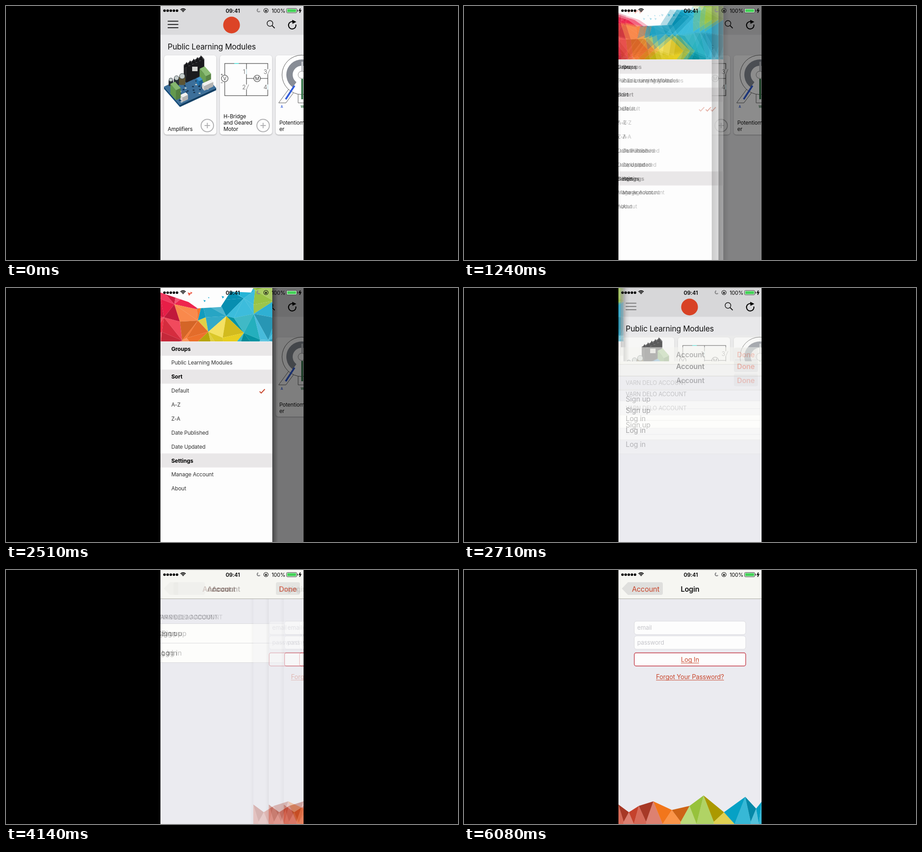
These frames come from a looping animation (998 by 561 pixels, 6120 ms). An HTML page with a canvas:

```html
<!DOCTYPE html>
<html lang="en">
<head>
<meta charset="utf-8">
<title>Learning modules app</title>
<style>
  html, body { margin: 0; width: 100%; height: 100%; overflow: hidden; background: #000; }
  canvas { display: block; width: 998px; height: 561px; }
</style>
</head>
<body>
<canvas id="stage" width="998" height="561"></canvas>
<script>
const W = 998, H = 561, LEFT = 341, WIDTH = 316, DRAWER = 247, BAR = 63.5;
const LOOP = 6120, STEP = 33.4, TAP = STEP / 2;
const OPEN = 1120, CLOSE = 2547, PUSH = 4088, SLIDE = 220;
const RED = '#c8452b', PAPER = '#fdfdfd', PAGE = '#ebebf0';

const stage = document.getElementById('stage').getContext('2d');
const buffer = document.createElement('canvas');
buffer.width = W;
buffer.height = H;
const c = buffer.getContext('2d');

const clamp = v => Math.max(0, Math.min(1, v));
const mix = (a, b, p) => a + (b - a) * p;
const easeOut = v => 1 - (1 - clamp(v)) ** 3;
// Critically damped spring from 0 to 1
function spring(ms) {
  const u = Math.max(0, ms) * 0.0176;
  return u > 11 ? 1 : 1 - (1 + u) * Math.exp(-u);
}
function random(n) {
  const v = Math.sin(n * 127.1 + 3.7) * 43758.5453;
  return v - Math.floor(v);
}
const tint = v => v > 0 ? `rgba(255,255,255,${v})` : `rgba(0,0,0,${-v})`;

function rect(fill, x, y, w, h) {
  c.fillStyle = fill;
  c.fillRect(x, y, w, h);
}
function trace(points) {
  c.beginPath();
  points.forEach(([x, y]) => c.lineTo(x, y));
}
function poly(fill, ...points) {
  trace(points);
  c.fillStyle = fill;
  c.fill();
}
function line(color, width, ...points) {
  trace(points);
  paint(null, color, width);
}
function paint(fill, stroke, width = 1) {
  if (fill) { c.fillStyle = fill; c.fill(); }
  if (stroke) { c.strokeStyle = stroke; c.lineWidth = width; c.stroke(); }
}
function circle(x, y, r, fill, stroke, width) {
  c.beginPath();
  c.arc(x, y, r, 0, 7);
  paint(fill, stroke, width);
}
function arc(x, y, r, from, to, color, width) {
  c.beginPath();
  c.arc(x, y, r, from, to);
  paint(null, color, width);
}
function box(x, y, w, h, r, fill, stroke, width) {
  c.beginPath();
  c.roundRect(x, y, w, h, r);
  paint(fill, stroke, width);
}
// y is the middle of the capital letters
function text(s, x, y, size, color = '#111', weight = 400, align = 'left') {
  c.font = `${weight} ${size}px Inter, sans-serif`;
  c.letterSpacing = `${-0.01 * size}px`;
  c.textAlign = align;
  c.fillStyle = color;
  c.fillText(s, x, y + size * 0.364);
  return c.measureText(s).width;
}
function link(s, y) {
  const w = text(s, 499, y, 14, RED, 400, 'center');
  rect(RED, 499 - w / 2, y + 7, w, 1);
}
function layer(alpha, x, y, draw) {
  if (alpha <= 0) return;
  c.save();
  c.globalAlpha *= alpha;
  c.translate(x, y);
  draw();
  c.restore();
}
function shade(x, w, alpha) {
  const g = c.createLinearGradient(x, 0, x + w, 0);
  g.addColorStop(0, tint(-alpha));
  g.addColorStop(1, 'rgba(0,0,0,0)');
  rect(g, x, 0, w, H);
}
function facet(color, light, ...points) {
  poly(color, ...points);
  poly(tint(light), ...points);
}

function statusBar() {
  for (let i = 0; i < 5; i++) circle(350 + i * 6.9, 10.3, 2.8, '#000');
  for (const r of [2, 5, 8]) arc(391, 14, r, -2.36, -0.78, '#000', 1.8);
  text('09:41', 500.7, 10.3, 12, '#000', 600, 'center');
  arc(558, 9.5, 3.4, 0.6, 4.4, '#8c8c8e', 2.4);
  circle(574, 10, 4.8, null, '#111', 1.1);
  rect('#111', 572, 9.5, 4, 3);
  arc(574, 9.4, 1.3, Math.PI, 0, '#111', 0.8);
  text('100%', 586.5, 10.3, 11.6, '#000');
  box(619.5, 5.5, 22.5, 9.5, 2, '#fff', '#333', 1);
  rect('#44d358', 621, 7, 19.5, 6.5);
  rect('#333', 643, 8.5, 1.5, 3.5);
  line('#000', 1.8, [650, 5.5], [647.5, 10.3], [651, 9.7], [648.3, 15]);
}

// Board space: u runs to the front corner, v to the back corner, z up.
const iso = (u, v, z) => [349 + 35 * u + 80 * v, 178 + 40 * u - 37 * v - z];
function block(color, u, v, du, dv, height, z = 0) {
  const top = z + height, front = u + du, back = v + dv;
  facet(color, -0.1, iso(u, v, z), iso(front, v, z), iso(front, v, top), iso(u, v, top));
  facet(color, -0.25, iso(front, v, z), iso(front, back, z), iso(front, back, top), iso(front, v, top));
  facet(color, 0.15, iso(u, v, top), iso(front, v, top), iso(front, back, top), iso(u, back, top));
}
function circuitBoard() {
  block('#1a5688', 0, 0, 1, 1, 5, -5);
  for (let i = 0; i < 45; i++) {
    const [x, y] = iso(0.08 + 0.84 * random(i), 0.05 + 0.9 * random(i + 60), 0);
    rect(i % 4 ? '#17324c' : '#cfd5cf', x - 2, y - 1, 4, 2.5);
  }
  block('#242428', 0.1, 0.5, 0.15, 0.5, 34);
  for (let i = 0; i < 5; i++) {
    const [x, y] = iso(0.1, 0.5 + i * 0.1, 34);
    poly('#17171a', [x, y + 6], [x + 6, y - 6], [x + 11, y + 5]);
  }
  rect('#d5d5d3', 411, 134, 12, 10);
  for (let i = 0; i < 3; i++) {
    const x = 364 + i * 12.5, y = 163 - i * 4, r = 5 + i;
    box(x - r, y, r * 2, r * 2.8, 3, i === 2 ? '#5d5534' : '#272f36');
    circle(x, y, r - 1, '#c5cdcb', '#39444a', 1);
  }
  block('#77b15d', 0.3, 0.85, 0.4, 0.14, 20);
  block('#2482c4', 0.45, 0.7, 0.15, 0.1, 10);
  block('#f0f0ee', 0.75, 0.72, 0.14, 0.25, 10);
  block('#f0f0ee', 0.8, 0.1, 0.14, 0.15, 10);
  block('#70ab56', 0.4, 0, 0.35, 0.13, 22);
}

function bridgeDiagram() {
  const ink = '#333', soft = '#555', left = 483, mid = 531, right = 578, top = 127, centre = 160, base = 198;
  c.strokeStyle = ink;
  c.lineWidth = 1.1;
  c.strokeRect(left, top, right - left, base - top);
  line(ink, 1.1, [mid, top], [mid, base]);
  line(ink, 1.1, [mid, centre], [right, centre]);
  line('#6be4dd', 2, [504, top], [514, top]);
  [[mid, 145], [right, 145], [mid, 179], [right, 179]].forEach(([x, y], i) => {
    const open = i === 1 || i === 2;
    rect(PAPER, x - 2, y - 5.5, 4, 11);
    line(open ? '#999' : '#b9dce4', 1.2, [x, y + 5.5], [x + (open ? 5 : 0), y - 5.5]);
    text([1, 3, 2, 4][i], x - 5.5, y + 0.7, 13, soft, 300, 'center');
  });
  for (const [x, s] of [[left, 'V'], [554.5, 'M']]) {
    circle(x, centre, 7.3, '#fff', ink, 1.1);
    text(s, x, centre, 10.5, ink, 400, 'center');
  }
  text('+', 476.5, 151, 9, ink, 400, 'center');
  text('−', 476.5, 169, 9, ink, 400, 'center');
}

function potentiometer() {
  const ink = '#555', blue = '#315cda', green = '#337246', x = 653, y = 152;
  line(ink, 1, [624, 184], [602, 214], [618, 214], [636, 190]);
  line(ink, 1, [645, 192], [645, 214], [664, 214]);
  circle(x, y, 43.5, '#fff', ink, 1);
  arc(x, y, 27, 2.2, 7.2, '#888d96', 14);
  line('#c3c5ca', 4, [x + 1, 123], [x + 1, 146]);
  circle(x, y, 8, '#fff', '#aaa', 1.3);
  line(green, 4, [x + 1, 161], [x + 1, 206]);
  line(blue, 4, [637, 176], [617.5, 206]);
  text('A', 609, 222, 7, blue, 600, 'center');
  text('W', x + 1, 222, 7, green, 600, 'center');
}

function card(index, lines, picture) {
  const x = 349 + index * 123.2;
  c.save();
  c.shadowColor = 'rgba(0,0,0,.28)';
  c.shadowBlur = 3;
  c.shadowOffsetY = 1.2;
  box(x, 109, 115.5, 175, 6, PAPER);
  c.restore();
  picture();
  lines.forEach((s, i) => text(s, x + 8, 272 - (lines.length - 1 - i) * 14, 11.8));
  const plus = x + 95.5, gray = '#b0b0b2';
  if (index === 2) return;
  circle(plus, 264, 13.8, null, gray, 2);
  rect(gray, plus - 6, 263, 12, 2);
  rect(gray, plus - 1, 258, 2, 12);
}

function home(menuAlpha) {
  rect('#ececee', LEFT, 0, WIDTH, H);
  rect('#dbdbdd', LEFT, 0, WIDTH, BAR);
  layer(menuAlpha, 0, 0, () => {
    for (let i = 0; i < 3; i++) rect('#000', 357, 32.7 + i * 7.2, 23.5, 1.7);
  });
  circle(498, 42, 18.5, '#dc4426');
  circle(582.8, 38.5, 6.3, null, '#111', 1.5);
  line('#111', 1.8, [587.3, 43], [593.3, 49]);
  arc(632, 42.5, 8.2, -0.2, 4.9, '#000', 2.2);
  poly('#000', [632, 30.5], [641, 35], [632.5, 39.5]);
  text('Public Learning Modules', 357, 90.3, 17);
  card(0, ['Amplifiers'], circuitBoard);
  card(1, ['H-Bridge', 'and Geared', 'Motor'], bridgeDiagram);
  card(2, ['Potentiomet', 'er'], potentiometer);
}

// Jittered triangle mesh, each facet coloured by its nearest patch
const PATCHES = [
  [18, 50, '#ee1f49'], [18, 100, '#ef3146'], [62, 85, '#f8762e'], [112, 106, '#d6c00c'], [138, 84, '#efd522'],
  [128, 56, '#0d9abd'], [172, 36, '#08aad2'], [184, 88, '#06a4b4'], [224, 82, '#30b3d6'], [232, 14, '#95c13d'],
];
function drawerArt() {
  const cell = 35, rows = 4, cols = 8;
  const node = (i, j) => [
    (i + 0.75 * (random(i * 9 + j) - 0.5)) * cell,
    (j + 0.75 * (random(i * 9 + j + 200) - 0.5)) * cell,
  ];
  const face = (seed, ...points) => {
    const x = points.reduce((sum, p) => sum + p[0], 0) / 3;
    const y = points.reduce((sum, p) => sum + p[1], 0) / 3;
    const distance = p => Math.hypot(p[0] - x, p[1] - y);
    const nearest = PATCHES.reduce((a, b) => distance(b) < distance(a) ? b : a);
    facet(nearest[2], 0.5 * random(seed) - 0.2, ...points);
  };
  for (let i = 0; i < 7; i++) {
    const x = 45 + random(i + 30) * 115, y = 6 + random(i + 40) * 24, s = 3 + random(i + 50) * 6;
    poly(x < 85 ? '#ee5a45' : '#22a9d0', [x, y], [x + s, y + s * 0.3], [x + s * 0.4, y + s]);
  }
  trace([[0, 10], [62, 31], [82, 45], [133, 42], [155, 8], [200, 10], [205, 0], [DRAWER, 0], [DRAWER, 118], [0, 118]]);
  c.clip();
  for (let i = -1; i < cols; i++) {
    for (let j = -1; j < rows; j++) {
      const a = node(i, j), b = node(i + 1, j), d = node(i, j + 1), e = node(i + 1, j + 1), seed = i * 31 + j * 7;
      if ((i + j) % 2) {
        face(seed, a, b, d);
        face(seed + 300, b, d, e);
      } else {
        face(seed, a, b, e);
        face(seed + 300, a, d, e);
      }
    }
  }
}

function drawer() {
  shade(LEFT + DRAWER, 13, 0.38);
  rect(PAPER, LEFT, 0, DRAWER, H);
  layer(1, LEFT, 0, drawerArt);
  const heads = ['Groups', 'Sort', 'Settings'];
  const rows = ['Groups', 'Public Learning Modules', 'Sort', 'Default', 'A-Z', 'Z-A',
    'Date Published', 'Date Updated', 'Settings', 'Manage Account', 'About'];
  rows.forEach((s, i) => {
    const bold = heads.includes(s), y = 134.3 + i * 30.85;
    if (bold) rect('#e9e7e8', LEFT, y - 15.7, DRAWER, 31);
    text(s, 365, y, bold ? 12.2 : 11.8, bold ? '#000' : '#333', bold ? 700 : 400);
  });
  line(RED, 2, [560, 228.5], [563.5, 232], [571.5, 223.5]);
}

function account() {
  rect(PAGE, LEFT, BAR, WIDTH, H);
  text('VARN DELO ACCOUNT', 357, 104, 12.5, '#77777c');
  rect('#fdfdfb', LEFT, 118, WIDTH, 86.5);
  for (let i = 0; i < 3; i++) rect('#d2d2d5', LEFT + (i === 1 ? 16 : 0), 118 + i * 43, WIDTH, 0.8);
  text('Sign up', 357, 140, 15.6, '#333');
  text('Log in', 357, 183.5, 15.6, '#333');
}

// Slopes hang between ridge points; a wedge under each point joins them.
const RIDGE = [[0, 518], [23, 535], [45, 521], [77, 511], [118, 530], [157, 521],
  [188, 498], [233, 535], [280, 501], [304, 527], [316, 512]];
function mountains() {
  const bands = [[77, '#cc452e'], [152, '#fa7a1c'], [203, '#9cc83e'], [234, '#d0ba00'], [WIDTH, '#05a6cb']];
  const color = x => bands.find(([end]) => x <= end)[1];
  const foot = i => {
    const a = RIDGE[Math.max(0, i)], b = RIDGE[Math.min(RIDGE.length - 1, i + 1)];
    return [(a[0] + b[0]) / 2, i % 2 ? 561 : 556];
  };
  RIDGE.forEach((point, i) => {
    const before = foot(i - 1), after = foot(i);
    facet(color(point[0] - 1), 0.2 + 0.12 * (i % 2), [before[0], 561], before, point, after, [after[0], 561]);
  });
  RIDGE.slice(1).forEach((b, i) => {
    const a = RIDGE[i], x = (a[0] + b[0]) / 2;
    facet(color(x), i % 2 ? -0.03 : -0.18, a, b, foot(i));
  });
}

function login() {
  shade(LEFT, -7, 0.1);
  rect(PAGE, LEFT, BAR, WIDTH, H);
  ['email', 'password'].forEach((s, i) => {
    const y = 113 + i * 32.5;
    box(376, y, 246, 29.5, 5, PAPER, '#dadade', 1);
    text(s, 382.5, y + 14.5, 13.1, '#c5c5ca');
  });
  box(376, 183, 246, 29, 4, PAPER, '#c33b48', 1.4);
  link('Log In', 198);
  link('Forgot Your Password?', 235.7);
  layer(1, LEFT, 0, mountains);
}

function navBar(p) {
  const size = 15.7, button = '#dfdfdd';
  rect('#f6f6f2', LEFT, 0, WIDTH, BAR);
  rect('#adada5', LEFT, BAR - 0.3, WIDTH, 0.9);
  layer(1 - p, 0, 0, () => {
    box(596, 27, 53, 28, 4, button);
    text('Done', 622.3, 42, size, '#d9553d', 600, 'center');
    text('Account', mix(499.5, 401, p), 42, size, '#222', 600, 'center');
  });
  layer(p, 0, 0, () => {
    poly(button, [348.5, 41], [362, 27], [380, 27], [380, 55], [362, 55]);
    box(370, 27, 69, 28, 4, button);
    text('Account', mix(499.5, 401, p), 42, size, RED, 400, 'center');
    text('Login', mix(690, 499, p), 42, size, '#111', 600, 'center');
  });
}

function sheet(push) {
  if (push < 1) layer(1, -0.3 * WIDTH * push, 0, account);
  if (push > 0) layer(1, WIDTH * (1 - push), 0, login);
  navBar(push);
}

function scene(t) {
  rect('#000', 0, 0, W, H);
  c.save();
  c.beginPath();
  c.rect(LEFT, 0, WIDTH, H);
  c.clip();
  const open = easeOut((t - OPEN) / SLIDE) * (1 - easeOut((t - CLOSE) / SLIDE));
  const rise = spring(t - CLOSE);
  if (rise < 1) home(t > OPEN ? 0.5 : 1);
  if (open > 0) {
    rect(tint(-0.5 * open), LEFT, 0, WIDTH, H);
    layer(1, -DRAWER * (1 - open), 0, drawer);
  }
  if (rise > 0) layer(1, 0, H * (1 - rise), () => sheet(spring(t - PUSH)));
  statusBar();
  c.restore();
}

// Each picture mixes three neighbouring moments, weighted 3:4:3.
let start;
function tick(now) {
  start ??= now;
  const t = Math.floor(((now - start) % LOOP) / STEP + 0.15) * STEP;
  [1, 4 / 7, 0.3].forEach((alpha, i) => {
    scene(t + (i - 1) * TAP);
    stage.globalAlpha = alpha;
    stage.drawImage(buffer, 0, 0);
  });
  requestAnimationFrame(tick);
}
requestAnimationFrame(tick);
</script>
</body>
</html>
```
